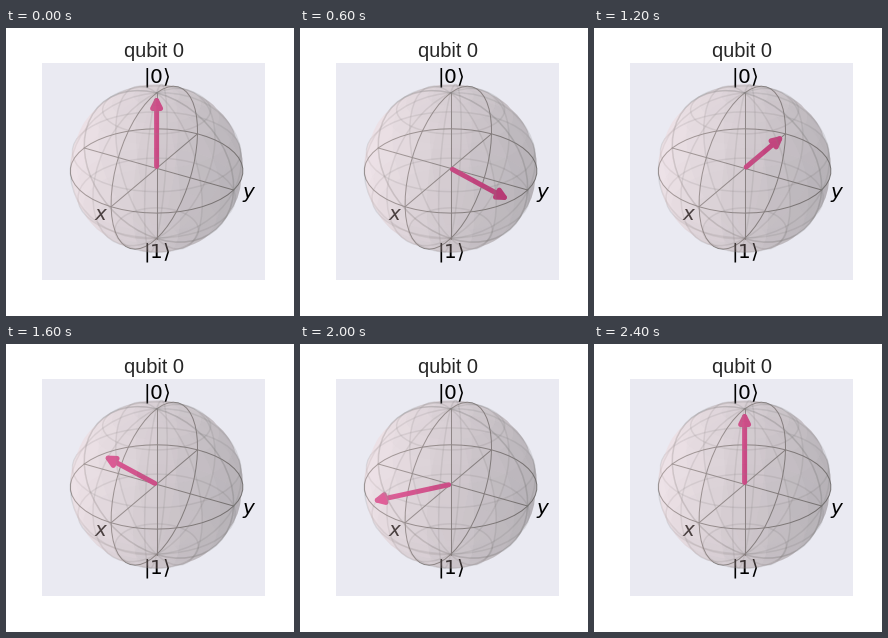
Recreate the animation shown at these times as a matplotlib script. Size 288 by 288 pixels, loop 2600 ms.

```python
import numpy as np
import matplotlib.pyplot as plt
from matplotlib.animation import FuncAnimation
from matplotlib.collections import LineCollection, PolyCollection
from matplotlib.patches import FancyArrowPatch

plt.rcParams.update({
    "font.family": "Liberation Sans",
    "mathtext.fontset": "dejavusans",
    "lines.solid_capstyle": "round",
})

STEPS = 10                 # phase steps around the equator
FRAMES = STEPS + 3         # |0>, a full turn from x back to x, |0>
INTERVAL = 200
HALF_BOX = 0.7
EYE = 10.0
SPHERE = np.array([255, 221, 221]) / 255

AZIM, ELEV = np.radians([-60, 30])
TOWARD = np.array([np.cos(ELEV) * np.cos(AZIM),
                   np.cos(ELEV) * np.sin(AZIM), np.sin(ELEV)])
RIGHT = np.array([-np.sin(AZIM), np.cos(AZIM), 0])
UP = np.cross(TOWARD, RIGHT)
LIGHT = np.array([-1, -1, 0.5]) / 1.5


def project(points):
    """Perspective view of (..., 3) points as (..., 2) screen positions."""
    p = np.asarray(points, float) / (2 * HALF_BOX)
    distance = EYE - p @ TOWARD
    return np.stack([p @ RIGHT, p @ UP], axis=-1) / distance[..., None]


def half_sphere(start):
    u = np.linspace(start, start + np.pi, 25)[:, None]
    v = np.linspace(0, np.pi, 25)[None, :]
    return np.stack([np.cos(u) * np.sin(v), np.sin(u) * np.sin(v),
                     np.cos(v) + 0 * u], axis=-1)


def draw_surface(grid, zorder):
    patches = []
    for i in range(0, 24, 2):
        for j in range(0, 24, 2):
            g = grid[i:i + 3, j:j + 3]
            patches.append(np.concatenate(
                [g[0, :-1], g[:-1, -1], g[-1, :0:-1], g[:0:-1, 0]]))
    patches.sort(key=lambda p: p.mean(axis=0) @ TOWARD)
    normals = np.array([p.mean(axis=0) for p in patches])
    normals /= np.linalg.norm(normals, axis=1, keepdims=True)
    shade = 0.3 + 0.7 * (normals @ LIGHT + 1) / 2
    ax.add_collection(PolyCollection(
        [project(p) for p in patches], facecolors=shade[:, None] * SPHERE,
        edgecolors="none", linewidths=0, alpha=0.2, zorder=zorder),
        autolim=False)


def draw_wires(grid, zorder):
    stops = [0, 5, 10, 15, 20, 24]
    lines = [grid[i] for i in stops] + [grid[:, j] for j in stops]
    ax.add_collection(LineCollection(
        [project(line) for line in lines], colors="gray", linewidths=1.5,
        alpha=0.2, zorder=zorder), autolim=False)


def draw_line(points):
    ax.plot(*project(points).T, color="gray", lw=1, zorder=1)


def draw_label(point, text):
    ax.text(*project(point), text, fontsize=20, color="black",
            ha="center", va="center", zorder=4)


fig = plt.figure(figsize=(4, 4), dpi=72, facecolor="white")
ax = fig.add_axes([0.125, 0.125, 0.775, 0.755], facecolor="#eaeaf2")
ax.set(xticks=[], yticks=[])
ax.spines[:].set_visible(False)
ax.set_title("qubit 0", fontsize=20, color="0.15", pad=6)

for axis in np.eye(3):
    draw_line([-axis, axis])
for start in (0, -np.pi):
    a = np.linspace(start, start + np.pi, 25)
    draw_line(np.stack([np.cos(a), np.sin(a), 0 * a], axis=-1))
    draw_line(np.stack([0 * a, np.cos(a), np.sin(a)], axis=-1))

back, front = half_sphere(0), half_sphere(-np.pi)
draw_surface(back, 3)
draw_wires(back, 5)
draw_wires(front, 6)
draw_surface(front, 7)

draw_label((0, -1.2, 0), "$x$")
draw_label((1.2, 0, 0), "$y$")
draw_label((0, 0, 1.2), r"$|0\rangle$")
draw_label((0, 0, -1.2), r"$|1\rangle$")

ax.set_xlim(-0.095, 0.09)
ax.set_ylim(-0.095, 0.09)

arrow = FancyArrowPatch((0, 0), (0, 0.05), arrowstyle="-|>", lw=5,
                        mutation_scale=20, color="#dc267f", zorder=2)
ax.add_patch(arrow)


def state(frame):
    """Qubit vector; x points along -y of the view and y along +x."""
    if frame in (0, FRAMES - 1):
        return 0, 0, 1
    phase = 2 * np.pi * (frame - 1) / STEPS
    return np.sin(phase), -np.cos(phase), 0


def update(frame):
    arrow.set_positions((0, 0), tuple(project(state(frame))))
    return [arrow]


anim = FuncAnimation(fig, update, frames=FRAMES, interval=INTERVAL,
                     repeat=True, repeat_delay=0)
plt.show()
```
